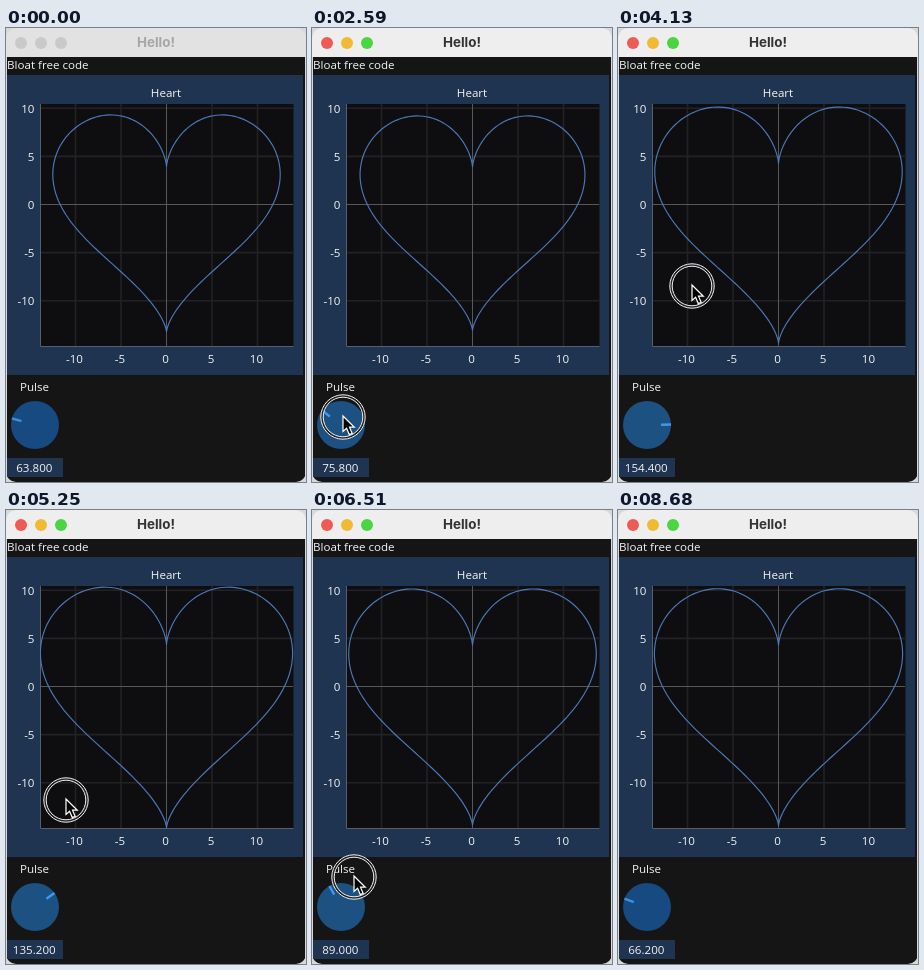
Write an HTML page that moves like this. It is 300x454 px and loops after 8.75 s.

```html
<!DOCTYPE html>
<html lang="en">
<head>
<meta charset="utf-8">
<title>Hello!</title>
<style>
  html, body { margin: 0; width: 100%; height: 100%; overflow: hidden; background: #d8d8d8; }
  svg { display: block; width: 300px; height: 454px; border-radius: 10px; }
  text { font: 11.6px "Open Sans", "Noto Sans", sans-serif; fill: #f4f4f4; }
  .mid { text-anchor: middle; }
  .end { text-anchor: end; }
  #title { font: 700 13.4px Inter, sans-serif; fill: #333; }
  .idle #bar { fill: #e2e2e2; }
  .idle #title { fill: #a6a6a6; }
  .idle #lights circle { fill: #c9c9c9; }
</style>
</head>
<body>
<svg id="stage" viewBox="0 0 300 454">
  <clipPath id="clip"><rect x="34" y="76" width="254" height="243"/></clipPath>
  <rect x="1" y="28" width="298" height="426" fill="#151515"/>
  <rect id="bar" width="300" height="29" fill="#efeeef"/>
  <g id="lights">
    <circle cx="15" cy="15" r="6" fill="#ee5b54"/>
    <circle cx="35" cy="15" r="6" fill="#f0ba33"/>
    <circle cx="55" cy="15" r="6" fill="#4ad541"/>
  </g>
  <text id="title" class="mid" x="150" y="19.3">Hello!</text>
  <text x="1" y="41">Bloat free code</text>

  <rect x="1" y="47" width="296" height="300" fill="#1e3450"/>
  <text class="mid" x="160" y="69">Heart</text>
  <rect x="34" y="76" width="253.5" height="243" fill="#0e0e10"/>
  <g id="grid"></g>
  <path d="M34.5 76V318.5H287.5" fill="none" stroke="#56606c"/>
  <path id="heart" clip-path="url(#clip)" fill="none" stroke="#4b78b6" stroke-width="1.15"/>

  <text x="14" y="363">Pulse</text>
  <circle id="knob" cx="29" cy="397" r="24"/>
  <path id="hand" d="M43.1 397H53" stroke-width="2.4"/>
  <rect x="1" y="430" width="56" height="19" fill="#1e3450"/>
  <text id="value" class="mid" x="28.3" y="444.3"></text>

  <g id="cursor">
    <g id="ring" fill="none">
      <circle cy="1" r="21" stroke="#222" stroke-width="2.5"/>
      <circle cy="1" r="22.2" stroke="#f2f2f2"/>
      <circle cy="1" r="19.8" stroke="#f2f2f2"/>
    </g>
    <path d="M0 0V15.5L3.6 12.2 6.3 18.6 9.2 17.4 6.5 11.2H11.3Z" fill="#000" stroke="#fff" stroke-width="1.2"/>
  </g>
</svg>
<script>
const $ = id => document.getElementById(id);
const LOOP = 8750, STEP = 70;
const FOCUS = 490, PRESS = 1750, RELEASE = 7630;
const X0 = 160.5, Y0 = 176.5, SX = 9.1, SY = 9.62;

// Pointer path: time, x, y
const path = [
  [420, 40, 462], [910, 33, 422], [1190, 31, 408], [1890, 31, 408],
  [2200, 33, 365], [2400, 33, 365], [2590, 31, 388],
  [3360, 52, 324], [4130, 74, 257], [4480, 76, 259], [4760, 74, 259],
  [5250, 60, 289], [5880, 50, 320.5], [6510, 42, 366],
  [7000, 36, 384], [7600, 32, 404], [7700, 32, 404], [8120, 36, 462]
];

function pointer(t) {
  const i = path.findIndex(p => p[0] > t);
  if (i < 1) return path[i < 0 ? path.length - 1 : 0].slice(1);
  const [a, b] = [path[i - 1], path[i]];
  const u = (t - a[0]) / (b[0] - a[0]);
  return [1, 2].map(k => a[k] + (b[k] - a[k]) * u);
}

// Dragging up raises the pulse by 0.6 per pixel
function pulse(t) {
  if (t < PRESS) return 63.8;
  return 63.8 + 0.6 * (408 - pointer(Math.min(t, RELEASE))[1]);
}

// Beat phase is the running integral of the pulse
const phases = [-1.762];
for (let t = 0; t < LOOP; t += 10)
  phases.push(phases.at(-1) + pulse(t + 5) * 0.1615 * 0.01);

function heart(k) {
  const { sin, cos, PI } = Math;
  let d = "";
  for (let i = 0; i <= 240; i++) {
    const a = i / 120 * PI;
    const x = 16 * sin(a) ** 3;
    const y = 13 * cos(a) - 5 * cos(2 * a) - 2 * cos(3 * a) - cos(4 * a);
    d += (i ? "L" : "M") + (X0 + SX * k * x).toFixed(2) + " " + (Y0 - SY * k * y).toFixed(2);
  }
  return d;
}

function gridLines() {
  let faint = "", labels = "";
  for (let v = -10; v <= 10; v += 5) {
    const x = X0 + SX * v, y = Y0 - SY * v;
    if (v) faint += `M${x} 76V318M34 ${y}H287`;
    labels += `<text class="mid" x="${x - 1}" y="335">${v}</text>
      <text class="end" x="28.5" y="${y + 4.3}">${v}</text>`;
  }
  $("grid").innerHTML = `<path d="${faint}" stroke="#222224" stroke-width="1.6"/>
    <path d="M${X0} 76V318M34 ${Y0}H287" stroke="#58585a"/>${labels}`;
}

function draw(t) {
  const [x, y] = pointer(t);
  const bpm = 63.8 + 0.6 * Math.round((pulse(t) - 63.8) / 0.6);
  const down = t >= PRESS && t < RELEASE;
  const hot = down || y < 421;

  $("stage").classList.toggle("idle", t < FOCUS);
  $("heart").setAttribute("d", heart(0.8 + 0.1 * Math.cos(phases[t / 10])));
  $("knob").setAttribute("fill", hot ? "#1c5182" : "#164a80");
  $("hand").setAttribute("stroke", hot ? "#4296f0" : "#3d8fe0");
  $("hand").setAttribute("transform", `rotate(${135 + 270 * (bpm - 30) / 150} 29 397)`);
  $("value").textContent = bpm.toFixed(3);
  $("cursor").setAttribute("transform", `translate(${Math.round(x)} ${Math.round(y)})`);
  $("ring").setAttribute("visibility", down ? "visible" : "hidden");
}

gridLines();
const start = performance.now();
function tick() {
  const t = (performance.now() - start) % LOOP;
  draw(Math.floor(t / STEP) * STEP);
  requestAnimationFrame(tick);
}
tick();
</script>
</body>
</html>
```
